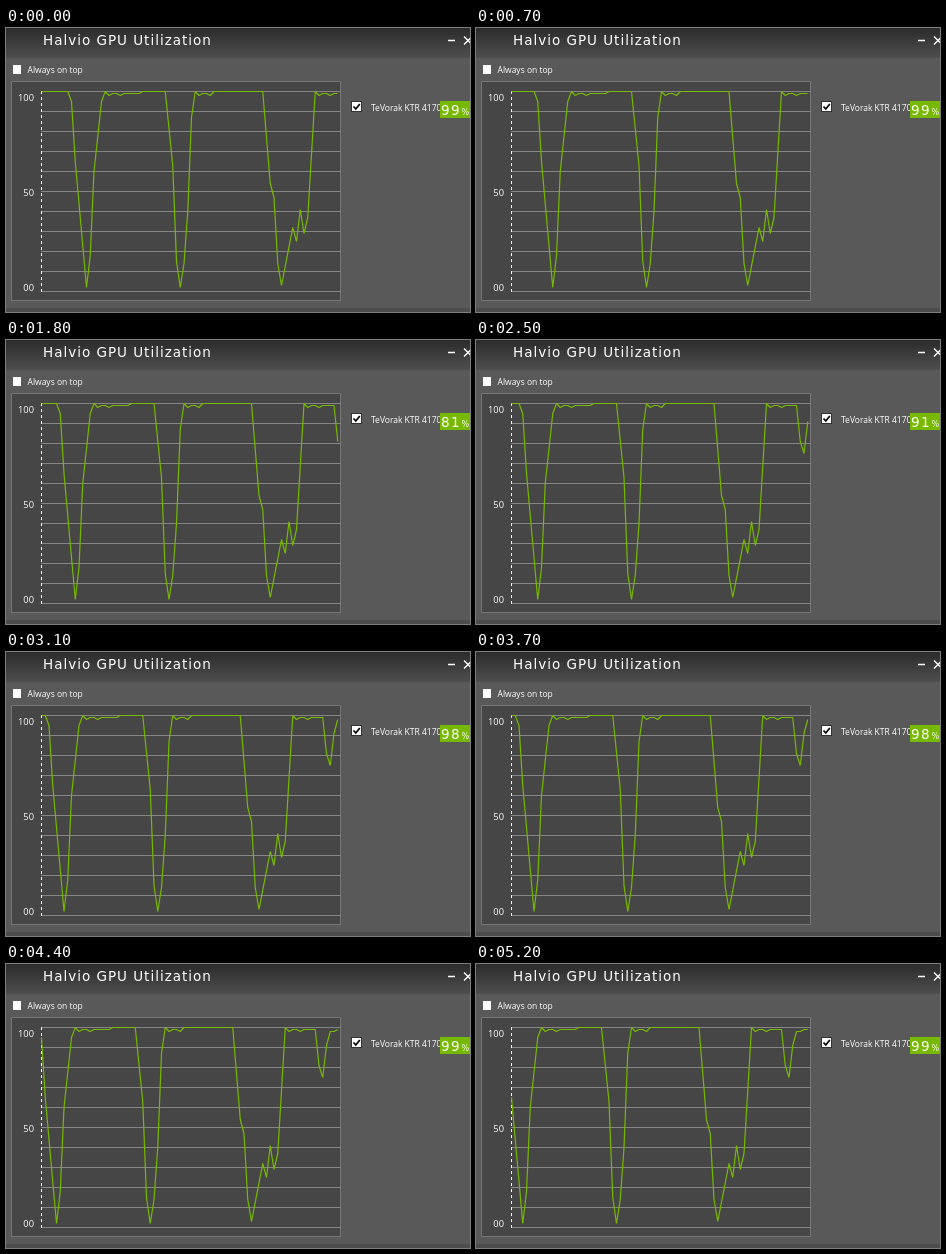
These frames come from a looping animation (464 by 284 pixels, 5300 ms). An HTML page:

```html
<!DOCTYPE html>
<html lang="en">
<head>
<meta charset="utf-8">
<title>GPU Utilization</title>
<style>
  html, body { margin: 0; width: 100%; height: 100%; overflow: hidden; background: #595959; }
  svg { display: block; width: 464px; height: 284px; }
  text { fill: #fff; font: 8.5px "Open Sans", "Noto Sans", sans-serif; }
  .wide { font-family: "DejaVu Sans", sans-serif; }
  .title { font-size: 13.5px; letter-spacing: 1px; }
  .axis { font-size: 9.3px; text-anchor: end; }
  .value { font-size: 13.5px; letter-spacing: 1.3px; }
  .unit { font-size: 8px; }
  .crisp { shape-rendering: crispEdges; }
  #grid { stroke: #858585; }
  #plot { fill: none; stroke: #76b900; stroke-width: 1.2; stroke-linejoin: bevel; }
</style>
</head>
<body>
<svg viewBox="0 0 464 284">
  <defs>
    <linearGradient id="bar" x2="0" y2="1">
      <stop offset="0" stop-color="#2b2b2b"/>
      <stop offset="1" stop-color="#4e4e4e"/>
    </linearGradient>
  </defs>
  <rect width="464" height="284" fill="#595959"/>
  <rect width="464" height="30" fill="url(#bar)"/>
  <rect y="280" width="464" height="4" fill="#4c4c4c"/>

  <text class="wide title" x="37" y="16.7">Halvio GPU Utilization</text>
  <path d="M442 12.5h7M458 8.5l8 8m0-8l-8 8" fill="none" stroke="#fff" stroke-width="1.3"/>

  <rect class="crisp" x="7" y="37" width="8" height="9" fill="#fff"/>
  <text x="21.5" y="45">Always on top</text>

  <g class="crisp">
    <rect x="5.5" y="53.5" width="329" height="219" fill="#464646" stroke="#777"/>
    <path id="grid"/>
    <path d="M35.5 63V264" stroke="#fff" stroke-dasharray="3 3"/>
  </g>
  <polyline id="plot"/>
  <text class="axis" x="28" y="73.3">100</text>
  <text class="axis" x="28" y="168">50</text>
  <text class="axis" x="28" y="263">00</text>

  <rect class="crisp" x="345.5" y="73.5" width="10" height="10" fill="#fff" stroke="#333"/>
  <path d="M347.5 78.5l2.3 2.5 4-5" fill="none" stroke="#000" stroke-width="1.7"/>
  <text x="365" y="82.5">TeVorak KTR 4170</text>
  <rect class="crisp" x="434" y="73" width="30" height="17" fill="#76b900"/>
  <text id="value" class="wide value" x="435" y="87.3">99</text>
  <text class="wide unit" x="455.5" y="87">%</text>
</svg>
<script>
  const LOOP = 5300, SHOWN = 80, STEP = 3.75;

  // Each dip: corner points [sample, load], then a ripple of the given length
  const dips = [
    { ripple: 9, keys: [[7, 100], [8, 95], [9, 65], [12, 2], [13, 18], [14, 60], [16, 95], [17, 100]] },
    { ripple: 4, keys: [[33, 100], [35, 63], [36, 15], [37, 2], [38, 14], [39, 40], [40, 87], [41, 100]] },
    { ripple: 8, keys: [[59, 100], [61, 54], [62, 47], [63, 14], [64, 3], [67, 32], [68, 25],
                        [69, 41], [70, 29], [71, 37], [73, 100]] },
    { ripple: 9, keys: [[81, 99], [82, 81], [83, 75], [84, 91], [85, 98]] }
  ];

  function loadAt(i) {
    const dip = dips.findLast(d => d.keys[0][0] <= i);
    if (!dip) return 100;
    const next = dip.keys.findIndex(k => k[0] >= i);
    if (next < 0) {
      const since = i - dip.keys.at(-1)[0];
      if (since > dip.ripple) return 100;
      const wave = Math.cos(2 * Math.PI * (since - 1) / 3);
      return 100 - Math.round(1 + 0.9 * wave * (1 - since / 12));
    }
    const [x1, v1] = dip.keys[next], [x0, v0] = dip.keys[Math.max(next - 1, 0)];
    return x1 === i ? v1 : v0 + (v1 - v0) * (i - x0) / (x1 - x0);
  }

  // Samples arrive about every 0.6 s, slowly spreading out, shown on a 100 ms clock
  const arrival = n => 100 * Math.ceil((160 + 553 * n + 6.7 * n * n) / 100);

  const byId = id => document.getElementById(id);
  const plot = byId("plot"), value = byId("value");
  const yOf = v => 263.5 - 2 * v;

  byId("grid").setAttribute("d",
    Array.from({ length: 11 }, (_, i) => `M35 ${yOf(i * 10)}H335`).join(""));

  let last = -1;
  function draw() {
    const t = performance.now() % LOOP;
    let first = 0;
    while (arrival(first) <= t) first++;
    if (first !== last) {
      last = first;
      const view = Array.from({ length: SHOWN }, (_, i) => loadAt(first + i));
      plot.setAttribute("points", view.map((v, i) => `${35.5 + STEP * i},${yOf(v)}`).join(" "));
      value.textContent = Math.round(view[SHOWN - 1]);
    }
    requestAnimationFrame(draw);
  }
  draw();
</script>
</body>
</html>
```
